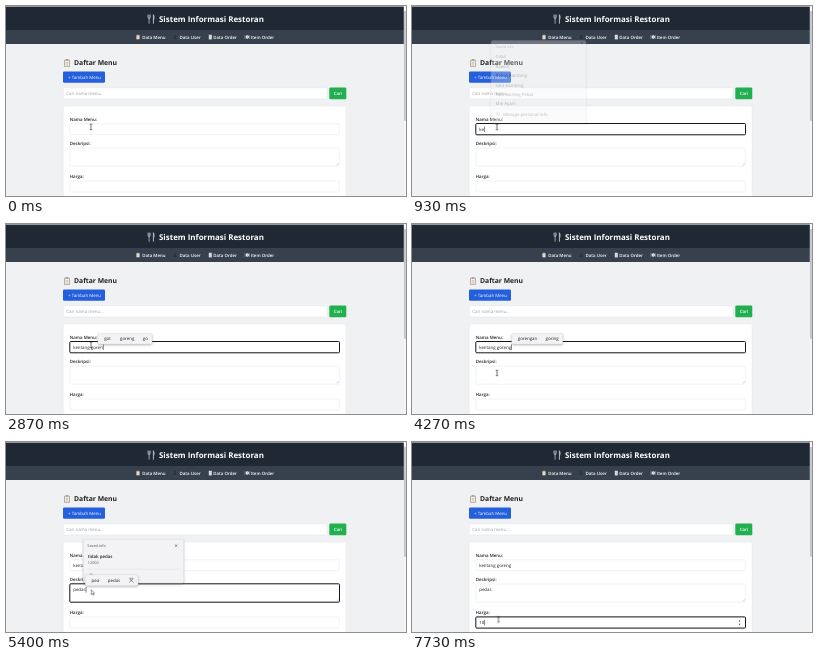
An HTML page for the animation above (8 s loop, 400 by 190 pixels).

```html
<!DOCTYPE html>
<html lang="id">
<head>
<meta charset="utf-8">
<title>Daftar Menu</title>
<style>
html, body { margin: 0; width: 100%; height: 100%; overflow: hidden; background: #f0f1f3; }
svg { display: block; width: 100vw; height: 100vh; }
text { font: 4.4px "Open Sans", "Noto Sans", sans-serif; fill: #222; white-space: pre; text-rendering: geometricPrecision; }
.bold { font-weight: 700; }
.semi { font-weight: 600; }
.light { fill: #fff; }
.field { fill: #fff; stroke: #e3e4e7; stroke-width: .5; }
.focus { fill: none; stroke: #16181c; stroke-width: 1; }
.panel { fill: #f3f3f5; stroke: #d5d6da; stroke-width: .4; filter: drop-shadow(0 1px 1.2px #0004); }
.small { font-size: 3.8px; fill: #555; }
.line { stroke: #d2d3d7; stroke-width: .4; }
.timed { animation: 8s linear infinite both; }
.step { animation-timing-function: step-end; }

#list { animation-name: list; }
@keyframes list {
  0%, 3.6% { opacity: 0; }
  5%, 10.8% { opacity: 1; }
  11.63% { opacity: .3; }
  12.5%, 100% { opacity: 0; }
}
#saved { animation-name: saved; }
@keyframes saved {
  0%, 55.4% { opacity: 0; }
  56.5%, 80.8% { opacity: 1; }
  82.5%, 100% { opacity: 0; }
}
#nameFocus { animation-name: nameFocus; }
@keyframes nameFocus { 0% { opacity: 0; } 3.4% { opacity: 1; } 55.4%, 100% { opacity: 0; } }
#descFocus { animation-name: descFocus; }
@keyframes descFocus { 0% { opacity: 0; } 55.4% { opacity: 1; } 84.25%, 100% { opacity: 0; } }
#priceFocus { animation-name: priceFocus; }
@keyframes priceFocus { 0% { opacity: 0; } 84.25%, 100% { opacity: 1; } }

#hintA { animation-name: hintA; }
@keyframes hintA { 0% { opacity: 0; } 33.3% { opacity: 1; } 39.1%, 100% { opacity: 0; } }
#hintB { animation-name: hintB; }
@keyframes hintB { 0% { opacity: 0; } 39.1% { opacity: 1; } 55.4%, 100% { opacity: 0; } }
#hintC { animation-name: hintC; }
@keyframes hintC { 0% { opacity: 0; } 59% { opacity: 1; } 80.8%, 100% { opacity: 0; } }

#mouse { animation-name: move; }
@keyframes move {
  0%, 45.8% { transform: translate(85px, 121px); animation-timing-function: ease-in-out; }
  52%, 74% { transform: translate(85px, 149px); animation-timing-function: ease-in-out; }
  78.4%, 100% { transform: translate(86.5px, 177.5px); }
}
#beam { animation-name: beam; }
@keyframes beam { 0% { opacity: 1; } 59% { opacity: 0; } 76%, 100% { opacity: 1; } }
#arrow { animation-name: arrow; }
@keyframes arrow { 0% { opacity: 0; } 59% { opacity: 1; } 76%, 100% { opacity: 0; } }
</style>
</head>
<body>
<svg viewBox="0 0 400 190" preserveAspectRatio="none">
  <defs>
    <g id="board">
      <rect x="-1.7" y="-2" width="3.4" height="4.4" rx=".4" fill="#b99a78"/>
      <rect x="-1.2" y="-1.5" width="2.4" height="3.5" fill="#f4f4f4"/>
      <rect x="-.8" y="-2.4" width="1.6" height="1" fill="#9aa3ad"/>
      <path d="M-.8-.4H.8M-.8.5H.8M-.8 1.3H.8" stroke="#8d949c" stroke-width=".3"/>
    </g>
  </defs>
  <rect width="400" height="190" fill="#f0f1f3"/>

  <rect width="398" height="24" fill="#1f2833"/>
  <rect y="24" width="398" height="14" fill="#37414e"/>
  <rect width="400" height=".7" fill="#c9ccd0"/>
  <rect x="397.8" width="2.2" height="190" fill="#f6f6f7"/>
  <rect x="398.5" y="5" width=".9" height="110" rx=".4" fill="#8f9296"/>

  <g fill="none" stroke="#c3cad1" stroke-linecap="round">
    <path d="M142 9v2.2q0 1.4 1.1 1.4t1.1-1.4V9M143.1 9v8.3" stroke-width=".75"/>
    <path d="M147.4 9v8.3" stroke-width=".9"/>
    <path d="M147.7 9.2q1 1.8.2 4" stroke-width=".8"/>
  </g>
  <text class="bold light" x="153" y="15.8" style="font-size:7.95px">Sistem Informasi Restoran</text>

  <use href="#board" x="132" y="31"/>
  <text class="semi light" x="136.2" y="32.8">Data Menu</text>
  <g fill="#29323f"><circle cx="169" cy="29.9" r="1"/><path d="M167.3 33q0-2 1.7-2t1.7 2z"/></g>
  <text class="semi light" x="173.6" y="32.8">Data User</text>
  <g><rect x="202.8" y="28.8" width="3" height="4.6" fill="#e5e7ea"/><path d="M203.4 30h1.8m-1.8 1.1h1.8m-1.8 1.1h1.8" stroke="#8d949c" stroke-width=".3"/></g>
  <text class="semi light" x="207.3" y="32.8">Data Order</text>
  <g><circle cx="241.3" cy="31" r="1.7" fill="#f1f2f3"/><circle cx="241.3" cy="31" r=".9" fill="#c4c8cc"/><path d="M239 29v4m4.6-4v4" stroke="#d5d8dc" stroke-width=".4"/></g>
  <text class="semi light" x="244.8" y="32.8">Item Order</text>

  <use href="#board" transform="translate(61 57) scale(1.65)"/>
  <text class="bold" x="68" y="59.3" style="font-size:6.8px">Daftar Menu</text>
  <rect x="57" y="65.5" width="42" height="11.3" rx="1.3" fill="#245fdc"/>
  <text class="light" x="62" y="72.8">+ Tambah Menu</text>

  <rect class="field" x="57.2" y="81.7" width="263.8" height="11.2" rx="1.2"/>
  <text x="60.2" y="88.8" style="fill:#9a9da2">Cari nama menu...</text>
  <rect x="323.3" y="81.5" width="17" height="11.7" rx="1.3" fill="#20b04f"/>
  <text class="light semi" x="327.7" y="88.9">Cari</text>

  <rect class="field" x="57.2" y="100" width="283" height="95" rx="2"/>
  <text class="semi" x="63.8" y="114.5">Nama Menu:</text>
  <rect class="field" x="64" y="117.7" width="269.3" height="11" rx="1.2"/>
  <text class="semi" x="63.8" y="138.8">Deskripsi:</text>
  <rect class="field" x="64" y="142" width="269.3" height="18.2" rx="1.2"/>
  <path d="M330.5 159.2l2-2m-.8 2l.8-.8" stroke="#888" stroke-width=".3"/>
  <text class="semi" x="63.8" y="171.6">Harga:</text>
  <rect class="field" x="64" y="175" width="269.3" height="11" rx="1.2"/>

  <rect id="nameFocus" class="focus timed step" x="63.8" y="117.5" width="269.7" height="11.3" rx="1"/>
  <rect id="descFocus" class="focus timed step" x="63.8" y="141.8" width="269.7" height="18.4" rx="1"/>
  <g id="priceFocus" class="timed step">
    <rect class="focus" x="63.8" y="174.9" width="269.7" height="11.2" rx="1"/>
    <path d="M326.6 179.4l1-1.4 1 1.4zM326.6 181.8l1 1.4 1-1.4z" fill="#444"/>
  </g>
  <g id="typed">
    <text x="67.2" y="124.6"></text>
    <text x="67.2" y="149.3"></text>
    <text x="67.2" y="182.1"></text>
  </g>
  <rect id="caret" width=".5" height="5.6" fill="#111"/>

  <g id="list" class="timed">
    <rect class="panel" x="79" y="34.5" width="95" height="82.5" rx="2"/>
    <text class="small" x="83.5" y="41.8">Saved info</text>
    <path d="M169 36.2l2 2m0-2l-2 2" stroke="#444" stroke-width=".5"/>
    <g id="rows"></g>
    <path class="line" d="M79 103h95"/>
    <circle cx="86.2" cy="108" r="1.4" fill="none" stroke="#666" stroke-width=".5"/>
    <text x="91" y="109.6">Manage personal info</text>
  </g>

  <g id="saved" class="timed">
    <rect class="panel" x="77.2" y="97.3" width="100.6" height="43.8" rx="2"/>
    <text class="small" x="81.3" y="105.1">Saved info</text>
    <path d="M168.9 102.5l2.4 2.4m0-2.4l-2.4 2.4" stroke="#333" stroke-width=".5"/>
    <text class="semi" x="81.8" y="115.6">tidak pedas</text>
    <text class="small" x="81.8" y="122.4">12000</text>
    <path class="line" d="M81 127.2h93"/>
    <circle cx="85.3" cy="133.2" r="1.4" fill="none" stroke="#555" stroke-width=".5"/>
  </g>

  <g id="hintA" class="timed step">
    <rect class="panel" x="92" y="109.2" width="54" height="10.8" rx="1.6"/>
    <text x="98.2" y="116">got</text><text x="114" y="116">goreng</text><text x="136.8" y="116">go</text>
  </g>
  <g id="hintB" class="timed step">
    <rect class="panel" x="99.8" y="109.2" width="51" height="10.8" rx="1.6"/>
    <text x="105.8" y="116">gorengan</text><text x="133.6" y="116">goring</text>
  </g>
  <g id="hintC" class="timed step">
    <rect class="panel" x="79.3" y="132.8" width="52.7" height="11" rx="1.6"/>
    <text x="85.5" y="140">pea</text><text x="101.8" y="140">pedas</text>
    <path d="M123.2 136.5l4.3 4m0-4l-4.3 4m.6-4.6q1.6 1.6 3.2 0" fill="none" stroke="#333" stroke-width=".5"/>
  </g>

  <g id="mouse" class="timed">
    <path id="beam" class="timed step" d="M-1.3-2.7H-.4L0-2.3.4-2.7H1.3M0-2.3V2.3M-1.3 2.7H-.4L0 2.3.4 2.7H1.3" fill="none" stroke="#111" stroke-width=".6"/>
    <path id="arrow" class="timed step" d="M.3-1.2v4.8l1.1-1 .8 1.7.7-.4-.8-1.6h1.5z" fill="#fff" stroke="#222" stroke-width=".45"/>
  </g>
</svg>
<script>
const LOOP = 8000, BLINK = 530;
const fields = [
  { text: 'kentang goreng', focus: 270, blur: 4430, top: 120.4,
    keys: [730, 870, 1070, 1200, 1400, 1530, 1650, 2130, 2270, 2330, 2530, 2670, 2730, 3130] },
  { text: 'pedas', focus: 4430, blur: 6740, top: 145, keys: [4530, 4730, 4900, 5100, 5390] },
  { text: '10', focus: 6740, blur: LOOP, top: 177.8, keys: [7530, 7730] }
];
const lines = document.querySelectorAll('#typed text');
const caret = document.getElementById('caret');

['Coba', 'Rawon', 'Bakso Kambing', 'Sate Kambing', 'Nasi Goreng Pekat', 'Mie Ayam'].forEach((name, i) => {
  const row = document.createElementNS('http://www.w3.org/2000/svg', 'text');
  row.setAttribute('x', 83.5);
  row.setAttribute('y', 52.4 + i * 9.4);
  row.textContent = name;
  document.getElementById('rows').append(row);
});

function draw(t) {
  let shown = false;
  fields.forEach((f, i) => {
    const past = f.keys.filter(k => k <= t);
    const value = f.text.slice(0, past.length);
    if (lines[i].textContent !== value) lines[i].textContent = value;
    if (t < f.focus || t >= f.blur) return;
    const last = past.length ? past[past.length - 1] : f.focus;
    shown = Math.floor((t - last) / BLINK) % 2 === 0;
    caret.setAttribute('x', 67.4 + (value ? lines[i].getComputedTextLength() : 0));
    caret.setAttribute('y', f.top);
  });
  caret.style.opacity = shown ? 1 : 0;
}

let start;
function tick(now) {
  start ??= now;
  draw((now - start) % LOOP);
  requestAnimationFrame(tick);
}
draw(0);
requestAnimationFrame(tick);
</script>
</body>
</html>
```
